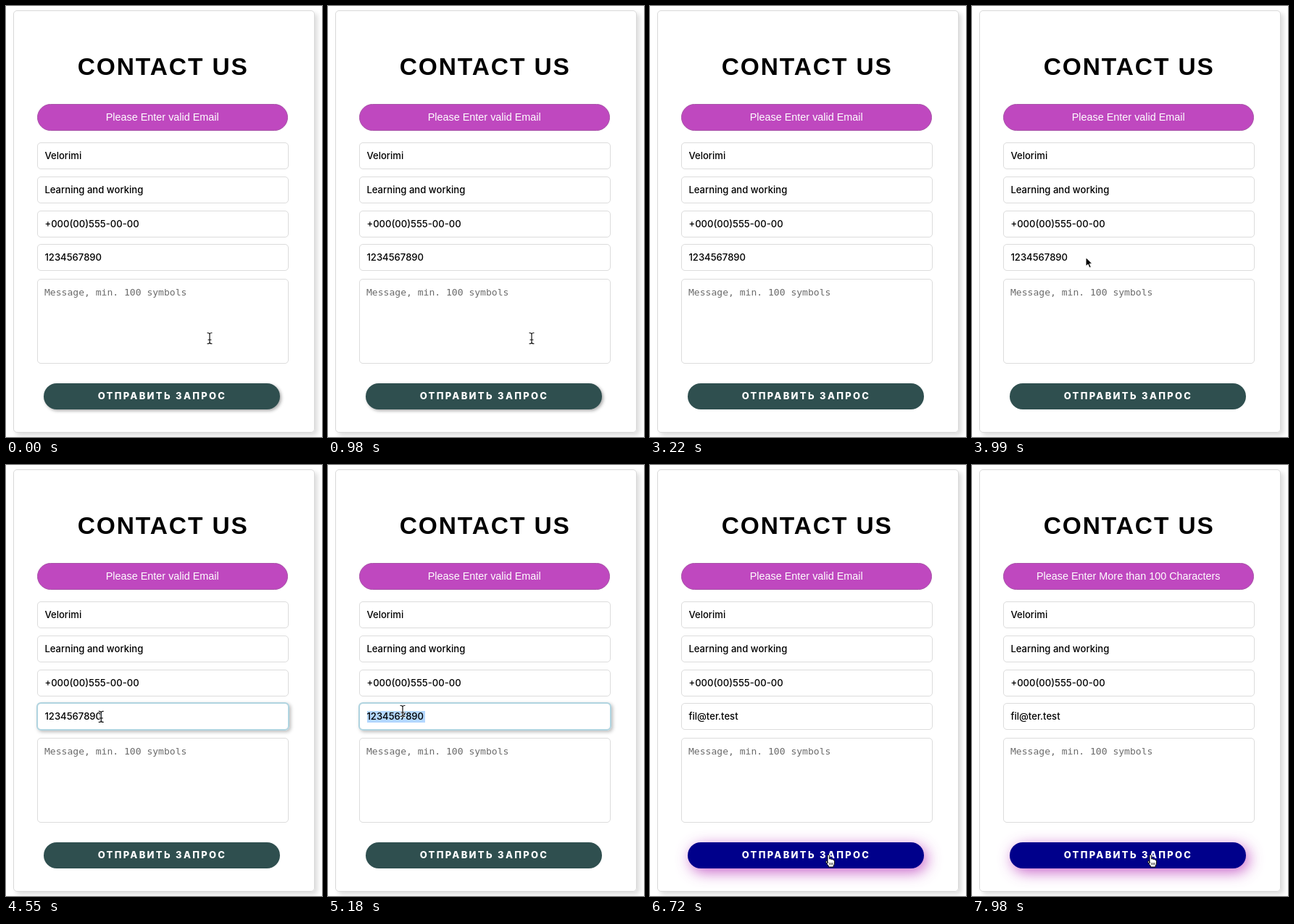
An HTML page for the animation above (8000 ms loop, 436 by 594 pixels).

```html
<!DOCTYPE html>
<html lang="en">
<head>
<meta charset="utf-8">
<title>Contact form</title>
<style>
  html, body { margin: 0; width: 100%; height: 100%; overflow: hidden; background: #fff; }
  #stage { position: relative; width: 436px; height: 594px; overflow: hidden; }
  #stage div, #stage svg { position: absolute; box-sizing: border-box; }
  .card { left: 10px; top: 6px; width: 416px; height: 582px; border: 1px solid #d9d9d9;
    border-radius: 5px; box-shadow: 4px 4px 6px #ddd; }
  .title { left: 98.7px; top: 63.5px; white-space: nowrap;
    font: bold 33.5px/40px "Liberation Sans", Arial, sans-serif; letter-spacing: 1.9px; }
  .alert { left: 43px; top: 134.5px; width: 345.5px; height: 37.5px; border-radius: 19px;
    background: #bf48bf; color: #fff; text-align: center; border: 1px solid #a855a8;
    font: 14.4px/35.5px "Liberation Sans", Arial, sans-serif; }
  .field { left: 43px; width: 346.5px; height: 37px; border: 1px solid #dcdcdc; border-radius: 5px;
    font: 500 13.1px/35px Inter, "Open Sans", sans-serif; }
  .field span { position: absolute; left: 9.4px; white-space: nowrap; }
  .field.focus::before { content: ""; position: absolute; inset: -2px; border: 2px solid #b0d4e0;
    border-radius: 6px; box-shadow: 2px 2px 5px #bbb; }
  .message { top: 376px; height: 117px; color: #6c6c6c;
    font: 13.05px/35px "DejaVu Sans Mono", monospace; }
  .message span { left: 9px; }
  #selection { top: 10px; height: 16px; background: #b3d7ff; }
  #button { left: 52px; top: 520px; width: 326px; height: 35.5px; border-radius: 18px;
    color: #fff; text-align: center; text-indent: 1px;
    font: 800 13px/35px Inter, "Open Sans", sans-serif; letter-spacing: 2.3px; }
  #stage #cursor { left: 0; top: 0; }
</style>
</head>
<body>
<div id="stage">
  <div class="card"></div>
  <div class="title">CONTACT US</div>
  <div class="alert" id="alert"></div>
  <div class="field" style="top:188px"><span>Velorimi</span></div>
  <div class="field" style="top:235px"><span>Learning and working</span></div>
  <div class="field" style="top:281.5px"><span>+000(00)555-00-00</span></div>
  <div class="field" id="email" style="top:328px"><div id="selection"></div><span id="emailText"></span></div>
  <div class="field message"><span>Message, min. 100 symbols</span></div>
  <div id="button">ОТПРАВИТЬ ЗАПРОС</div>
  <svg id="cursor" width="436" height="594" stroke-linejoin="round" stroke-linecap="round">
    <defs>
      <path id="beamShape" d="M-3-7.5Q0-7.5 0-5.5Q0-7.5 3-7.5M0-5.5V5.5M-3 7.5Q0 7.5 0 5.5Q0 7.5 3 7.5M-2 2H2"/>
    </defs>
    <g id="beam" fill="none">
      <use href="#beamShape" stroke="#fff" stroke-width="2.6"/>
      <use href="#beamShape" stroke="#111" stroke-width="1.2"/>
    </g>
    <path id="arrow" d="M0 0V13L3 10.3L5.1 15L7.4 14L5.4 9.4H9.3Z" fill="#000" stroke="#fff" stroke-width="1.1"/>
    <g id="hand" fill="#fff" stroke="#000" stroke-width="1">
      <path d="M-3.5 3V-7Q-3.3-8.5-2-8.4Q-.9-8.2-.8-7V-2.5Q.7-3.6 1.7-2Q3.3-2.9 4.1-1.2Q6.1-1.7 6.1.7V3.5Q6 5.5 4.6 7V8.5H-2.2V7Q-3.5 5.5-5.8 2Q-6.4.6-5.3.2Q-4.5 0-3.5 1.5Z"/>
      <path d="M-.6 3V5.5M1.5 3V5.5M3.5 3V5.5" fill="none" stroke-width=".8"/>
    </g>
  </svg>
</div>
<script>
const LOOP = 8000;
const el = id => document.getElementById(id);
const clamp = v => Math.min(1, Math.max(0, v));
const mix = (a, b, k) => a + (b - a) * k;

const FOCUS = 4480, PASTE = 5500, HOVER = 6340, CLICK = 6580, REPLY = 6860, IDLE = 1330;
const TEXT_LEFT = 53.5, TEXT_RIGHT = 133.5;

// time, x, y, pointer shape used from that moment on
const track = [
  [0, 281, 458, 'beam'],
  [IDLE, 281, 458, ''],
  [3430, 26, 543, 'arrow'],
  [3990, 157, 346, 'arrow'],
  [4340, 157, 346, 'beam'],
  [FOCUS, 139, 347, 'beam'],
  [4900, 37, 346, 'beam'],
  [5060, 37, 346, 'beam'],
  [5180, 103, 339, 'beam'],
  [5560, 103, 339, 'beam'],
  [5900, 236, 508, 'arrow'],
  [6020, 253.5, 533, 'hand'],
  [6300, 253.5, 533, 'hand'],
  [6440, 248.5, 545.5, 'hand'],
  [LOOP, 248.5, 545.5, 'hand']
];

function pointerAt(t) {
  const i = track.findIndex(p => p[0] > t) - 1;
  const [t0, x0, y0, shape] = track[i], [t1, x1, y1] = track[i + 1];
  const u = (t - t0) / (t1 - t0), k = u * u * (3 - 2 * u);
  return { x: mix(x0, x1, k), y: mix(y0, y1, k), shape };
}

function render(t) {
  const pointer = pointerAt(t);
  for (const shape of ['beam', 'arrow', 'hand']) {
    el(shape).style.display = shape === pointer.shape ? '' : 'none';
    el(shape).setAttribute('transform', `translate(${pointer.x} ${pointer.y})`);
  }

  el('alert').textContent = t < REPLY ? 'Please Enter valid Email' : 'Please Enter More than 100 Characters';
  el('emailText').textContent = t < PASTE ? '1234567890' : 'fil@ter.test';
  el('email').classList.toggle('focus', t >= FOCUS && t < CLICK);

  const selecting = t >= FOCUS && t < PASTE;
  const from = t < 4900 ? Math.min(TEXT_RIGHT, Math.max(TEXT_LEFT, pointer.x)) : TEXT_LEFT;
  el('selection').style.left = from - 44 + 'px';
  el('selection').style.width = (selecting ? TEXT_RIGHT - from : 0) + 'px';

  const hover = clamp((t - HOVER) / 300);
  const button = el('button').style;
  button.background = `rgb(${mix(47, 0, hover)}, ${mix(79, 0, hover)}, ${mix(79, 139, hover)})`;
  button.boxShadow = t < IDLE ? '2px 2px 4px #aaa' : `4px 5px 20px rgba(191, 72, 191, ${0.85 * hover})`;
}

const start = performance.now();
function tick() {
  render((performance.now() - start) % LOOP);
  requestAnimationFrame(tick);
}
tick();
</script>
</body>
</html>
```
